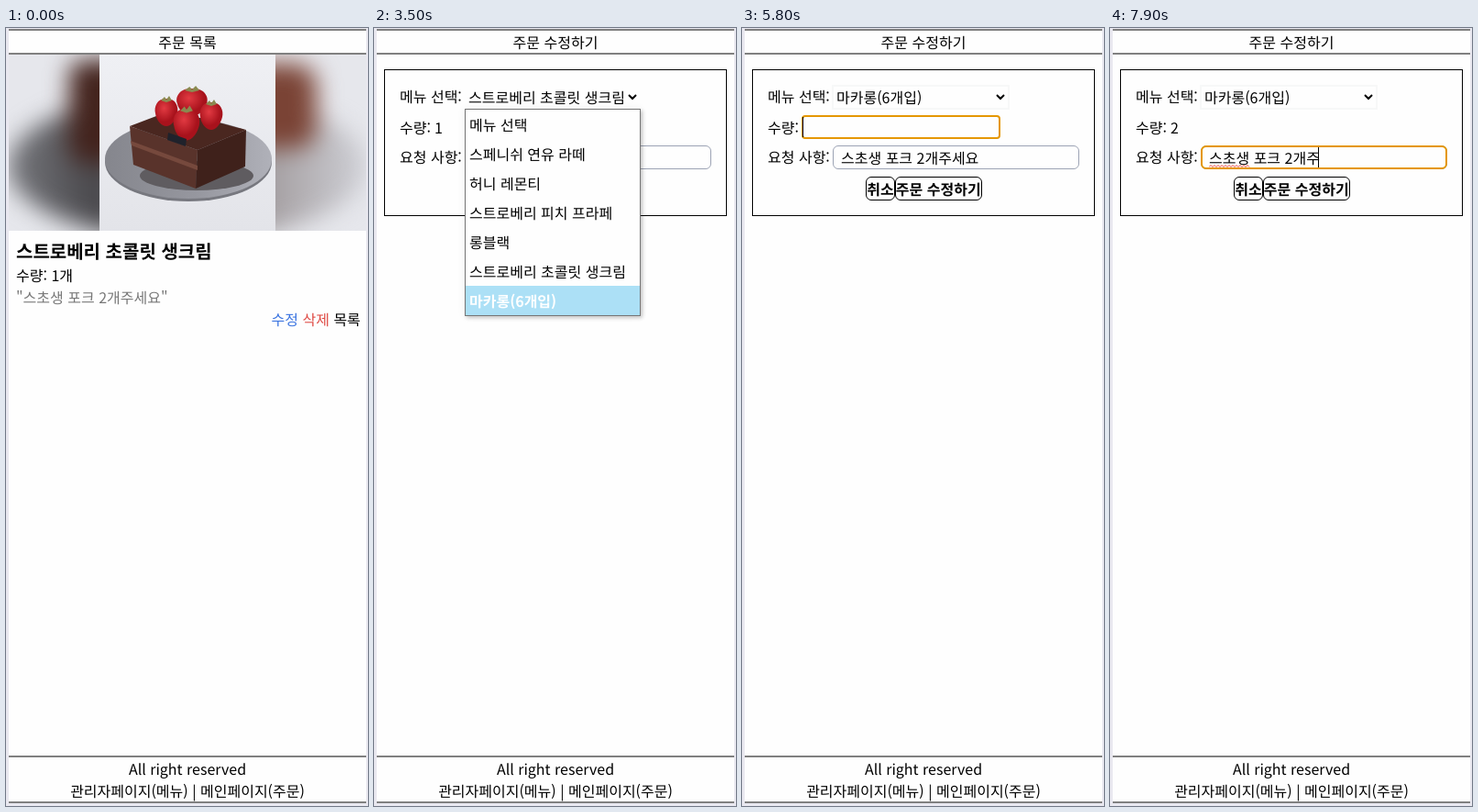
These frames come from a looping animation (395 px wide and 848 px high, 8 s). An HTML page:

```html
<!DOCTYPE html>
<html lang="ko">
<head>
<meta charset="utf-8">
<title>주문 목록</title>
<style>
  html, body { margin: 0; width: 100%; height: 100%; overflow: hidden; background: #e9e8f0; }
  body { position: relative; font: 16px/24px "Noto Sans CJK KR", "Noto Sans CJK", "Noto Sans", sans-serif; color: #000;
    text-rendering: geometricPrecision; }
  div, span, svg { position: absolute; box-sizing: border-box; white-space: pre; }
  [hidden] { display: none !important; }

  #page { left: 3px; top: 1px; width: 390px; height: 844px; background: #fefefe; }
  .bar { left: 3px; width: 390px; border: solid #808080; border-width: 2px 0; text-align: center; }
  #title { top: 1px; height: 28px; }
  #foot { top: 793px; height: 52px; }

  #photo { left: 3px; top: 29px; width: 390px; height: 192px; overflow: hidden; background: #e6e7ec; }
  #blur { left: 0; top: 0; width: 390px; height: 192px; overflow: visible; filter: blur(13px); }
  #sharp { left: 99px; top: 0; width: 192px; height: 192px; }
  #name { left: 11px; top: 229px; font: bold 20px/28px "Noto Sans CJK KR", "Noto Sans CJK", sans-serif; }
  #links { left: 289.5px; top: 305px; }
  #links span { position: static; }

  #form { left: 11px; top: 45px; width: 374px; height: 160px; border: 1px solid #000; }
  .label { left: 28px; }
  #menu { left: 103px; top: 63px; }
  #arrow { top: 71px; width: 12px; height: 9px; }
  #ghost { left: 98px; top: 62px; width: 194px; height: 27px; border: 2px solid #f7f8f8; }
  #qty { left: 66px; top: 96px; }
  #box { left: 99px; top: 128px; width: 269px; height: 26px; border: 1px solid #9ca3b4; border-radius: 6px; }
  #note { left: 108px; top: 129px; }
  #wave { left: 108px; top: 148px; width: 45px; height: 5px; }
  .button { top: 162px; height: 26px; border: 1px solid #000; border-radius: 6px; font-weight: bold; }
  #ring { border: 2px solid #e59700; border-radius: 4px; }
  #ring.menu { left: 98px; top: 61px; width: 194px; height: 28px; }
  #ring.qty { left: 65px; top: 95px; width: 217px; height: 26px; }
  #ring.note { left: 99px; top: 128px; width: 269px; height: 26px; border-radius: 6px; }
  #caret { width: 1px; height: 22px; background: #000; }

  #list { left: 99px; top: 88px; width: 192px; height: 226px; border: 1px solid #767676;
    background: #fefefe; box-shadow: 0 0 9px #0001, 2px 2px 4px #0003; }
  #list div { left: 0; width: 190px; height: 32px; padding-left: 4px; line-height: 32px; }
  #list .on { background: #ace0f6; color: #fff; font-weight: bold; }
</style>
</head>
<body>
<svg width="0" height="0">
  <defs>
    <linearGradient id="wall" x1="0" y1="0" x2="0" y2="1">
      <stop offset="0" stop-color="#eff0f4"/><stop offset="1" stop-color="#e3e4e9"/>
    </linearGradient>
    <linearGradient id="dish">
      <stop offset="0" stop-color="#85868d"/><stop offset=".55" stop-color="#96979f"/><stop offset="1" stop-color="#b0b1b9"/>
    </linearGradient>
    <linearGradient id="haze">
      <stop offset="0" stop-color="#77787d"/><stop offset=".25" stop-color="#48474b"/>
      <stop offset=".75" stop-color="#a8a3a6"/><stop offset="1" stop-color="#cfd0d6"/>
    </linearGradient>
    <radialGradient id="red" cx=".4" cy=".35">
      <stop offset="0" stop-color="#e23a42"/><stop offset="1" stop-color="#a8121c"/>
    </radialGradient>
    <g id="berry">
      <path d="M0 -14C9 -15 14 -6 12 2C10 10 5 16 0 16C-5 16 -11 10 -12 2C-14 -6 -9 -15 0 -14Z" fill="url(#red)"/>
      <path d="M-6 -12L-2 -16L0 -13L3 -17L6 -12L0 -10Z" fill="#8a8a50"/>
    </g>
  </defs>
</svg>

<div id="page"></div>
<div id="title" class="bar"></div>

<div id="order">
  <div id="photo">
    <svg id="blur">
      <ellipse cx="195" cy="122" rx="196" ry="80" fill="url(#haze)"/>
      <rect x="66" y="6" width="130" height="112" rx="16" fill="#43231d"/>
      <rect x="196" y="10" width="140" height="92" rx="24" fill="#7a4335"/>
    </svg>
    <svg id="sharp" viewBox="0 0 192 192">
      <rect width="192" height="192" fill="url(#wall)"/>
      <ellipse cx="97" cy="117" rx="91" ry="43" fill="#77787f"/>
      <ellipse cx="97" cy="114" rx="91" ry="43" fill="url(#dish)"/>
      <ellipse cx="106" cy="132" rx="62" ry="16" fill="#5f5c60"/>
      <path d="M33 78L107 104L105 146L37 120Z" fill="#59332b"/>
      <path d="M107 104L160 82L159 122L105 146Z" fill="#3f211b"/>
      <path d="M34 94L107 121L107 126L35 99Z" fill="#76493d"/>
      <path d="M33 78L62 67L112 69L160 82L107 104Z" fill="#4a2720"/>
      <use href="#berry" transform="translate(101 51) scale(1.35 1)"/>
      <use href="#berry" x="73" y="62"/>
      <use href="#berry" x="122" y="66"/>
      <use href="#berry" transform="translate(95 75) scale(1.15)"/>
      <path d="M75 85L95 92L94 100L74 93Z" fill="#20222b"/>
    </svg>
  </div>
  <span id="name">스트로베리 초콜릿 생크림</span>
  <span style="left:11px;top:257px">수량: 1개</span>
  <span style="left:11px;top:281px;color:#777">"스초생 포크 2개주세요"</span>
  <div id="links"><span style="color:#3b74e0">수정</span> <span style="color:#df4b45">삭제</span> <span>목록</span></div>
</div>

<div id="edit">
  <div id="form"></div>
  <span class="label" style="top:62px">메뉴 선택:</span>
  <div id="ghost"></div>
  <span id="menu"></span>
  <svg id="arrow"><path d="M2 2L6 6L10 2" fill="none" stroke="#000" stroke-width="2"/></svg>
  <span class="label" style="top:96px">수량:</span>
  <span id="qty"></span>
  <span class="label" style="top:128px">요청 사항:</span>
  <div id="box"></div>
  <span id="note"></span>
  <svg id="wave"><path fill="none" stroke="#e8443c"/></svg>
  <div class="button" style="left:135.3px">취소</div>
  <div class="button" style="left:166.8px">주문 수정하기</div>
  <div id="ring"></div>
  <div id="caret"></div>
  <div id="list"></div>
</div>

<div id="foot" class="bar">All right reserved
관리자페이지(메뉴) | 메인페이지(주문)</div>

<script>
const LOOP = 8000;
const $ = id => document.getElementById(id);
const items = ["메뉴 선택", "스페니쉬 연유 라떼", "허니 레몬티", "스트로베리 피치 프라페",
  "롱블랙", "스트로베리 초콜릿 생크림", "마카롱(6개입)"];
const note = "스초생 포크 2개주세요";

// Each step keeps the values of the one before it.
const steps = [
  [0, { page: "order", item: 0, qty: "0", note: "", open: -1, focus: "", caret: 0, wave: false }],
  [1100, { page: "edit" }],
  [1400, { item: 5, qty: "1", note }],
  [1900, { open: 5 }],
  [3500, { open: 6 }],
  [3600, { open: -1, item: 6, focus: "menu" }],
  [5000, { focus: "note", caret: 137, wave: true }],
  [5400, { focus: "qty", caret: 74, wave: false }],
  [5800, { qty: "", caret: 66 }],
  [6100, { qty: "2", caret: 74 }],
  [6600, { focus: "note", caret: 108 }],
  [6700, { wave: true }],
  [7100, { caret: 0 }],
  [7600, { caret: 108 }],
  [7700, { caret: 256 }],
  [7800, { note: note.slice(0, -1), caret: 242 }],
  [7900, { note: note.slice(0, -2), caret: 227 }]
];
let last = {};
const states = steps.map(([at, change]) => [at, last = { ...last, ...change }]);

const rows = items.map((text, i) => {
  const row = document.createElement("div");
  row.textContent = text;
  row.style.top = i * 32 + "px";
  $("list").append(row);
  return row;
});
$("wave").firstChild.setAttribute("d", "M0 3.5" + "l2 -2l2 2".repeat(11));

function show(s) {
  const editing = s.page === "edit";
  $("order").hidden = editing;
  $("edit").hidden = !editing;
  $("title").textContent = editing ? "주문 수정하기" : "주문 목록";
  $("menu").textContent = items[s.item];
  $("arrow").style.left = (s.item ? 276 : 169) + "px";
  $("ghost").hidden = s.item !== 6;
  $("qty").textContent = s.qty;
  $("note").textContent = s.note;
  $("wave").style.display = s.wave ? "" : "none";
  $("ring").className = s.focus;
  $("ring").hidden = !s.focus;
  $("caret").hidden = !s.caret;
  $("caret").style.left = s.caret + "px";
  $("caret").style.top = (s.focus === "qty" ? 97 : 130) + "px";
  $("list").hidden = s.open < 0;
  rows.forEach((row, i) => row.className = i === s.open ? "on" : "");
}

let current;
const start = performance.now();
function tick() {
  const t = (performance.now() - start) % LOOP;
  const state = states.filter(([at]) => at <= t).pop()[1];
  if (state !== current) show(current = state);
  requestAnimationFrame(tick);
}
tick();
</script>
</body>
</html>
```
